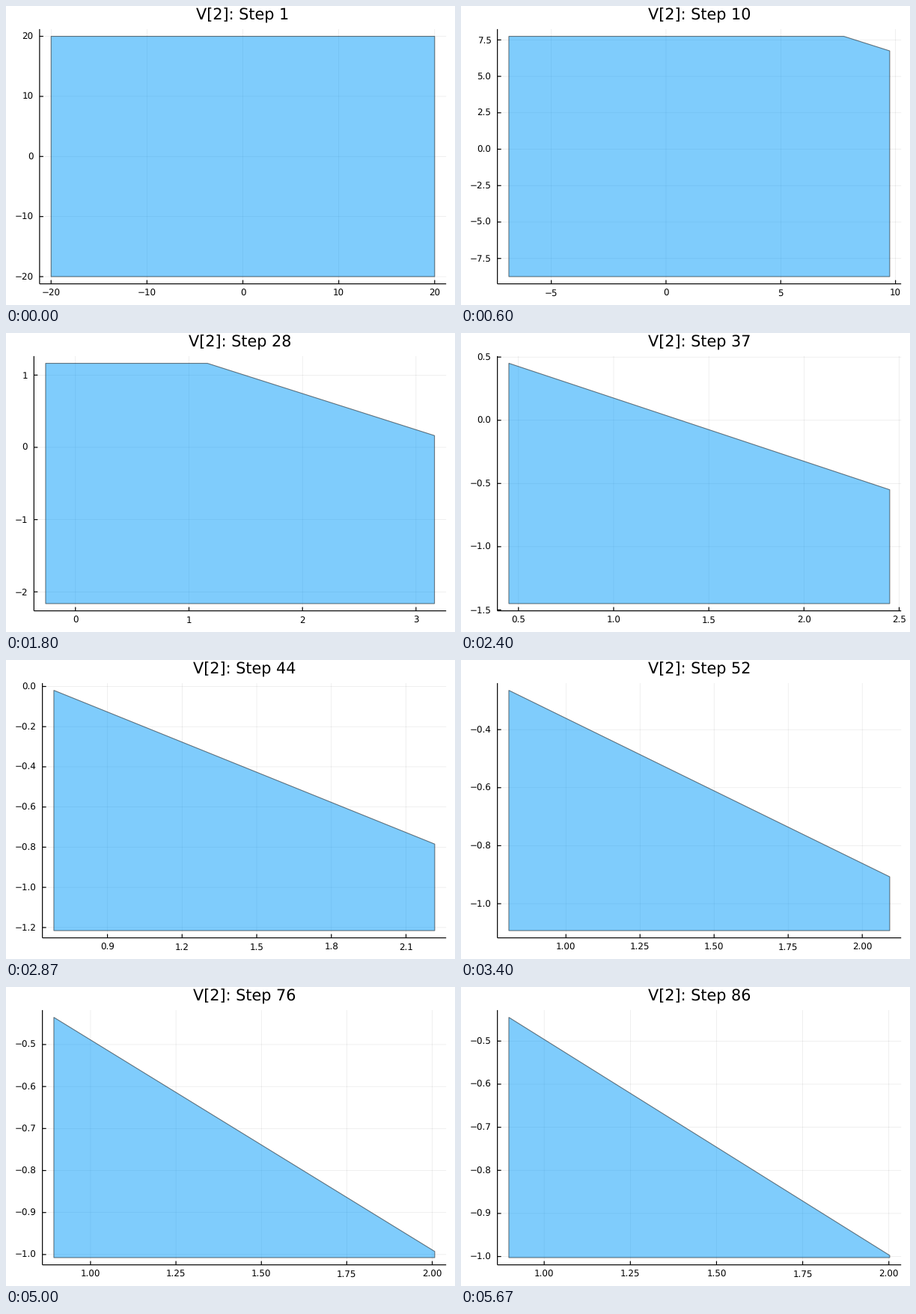
Recreate the animation shown at these times as a matplotlib script. Size 600 by 400 pixels, loop 5740 ms.

```python
import math

import matplotlib.pyplot as plt
from matplotlib.animation import FuncAnimation
from matplotlib.collections import LineCollection
from matplotlib.patches import Polygon

W, H, DPI = 600, 400, 100
STEPS, FPS = 86, 15
LOOP_MS, TICK_MS = 5740, 20
TOP, BOTTOM, RIGHT = 30.9, 371.7, 588.2
PT = 72 / DPI
TICK_SIZE, TITLE_SIZE = 11.86, 20.75
TICK_LEN = 5
DISCOUNT, BOUND = 0.9, 20
NICE = [(1, 1.0), (5, 0.9), (2, 0.7), (2.5, 0.5), (3, 0.2)]
EM = {"−": 0.838, ".": 0.318}

plt.rcParams.update({"font.family": "DejaVu Sans", "text.hinting": "none"})


def value_set(step):
    """Corners of the set, which shrinks geometrically to a triangle."""
    if step == 1:
        b = BOUND
        return [(-b, -b), (b, -b), (b, b), (-b, b)]
    e = BOUND * DISCOUNT ** (step - 1)
    left, right, low = 0.9 - e, 2 + e, -1 - e
    pts = [(left, low), (right, low), (right, e - 1)]
    if e > left:
        pts += [(e, e), (left, e)]
    else:
        pts.append((left, 2 * e - 0.45))
    return pts


def padded(vals):
    lo, hi = min(vals), max(vals)
    pad = 0.03 * (hi - lo)
    return lo - pad, hi + pad


def nice_ticks(lo, hi):
    """Best scoring set of 4 to 8 round ticks, with their labels."""
    span = hi - lo
    top = math.ceil(math.log10(span))
    best, choice = (-math.inf,), None
    for z in range(top, top - 3, -1):
        for q, niceness in NICE:
            gap = q * 10.0 ** z
            first, last = math.ceil(lo / gap), math.floor(hi / gap)
            n = last - first + 1
            if not 4 <= n <= 8:
                continue
            # a grid reaching zero scores higher if it is not too wide
            reach = (max(math.ceil(hi / gap), 0)
                     - min(math.floor(lo / gap), 0))
            zero = reach * gap < 2 * span and reach < 16
            score = ((1 - abs(n - 5) / 5) / 4 + zero / 6
                     + 0.75 * span / ((n - 1) * gap) + niceness / 4)
            # equal scores: coarser grid first
            rank = (round(score, 9), z, -reach)
            if rank > best:
                best, choice = rank, (gap, first, last)
    gap, first, last = choice
    places = next(d for d in range(8) if abs(round(gap, d) - gap) < 1e-9)
    ticks = [i * gap for i in range(first, last + 1)]
    return ticks, [f"{t:.{places}f}".replace("-", "−") for t in ticks]


def text_width(s):
    return TICK_SIZE * sum(EM.get(c, 0.636) for c in s)


fig = plt.figure(figsize=(W / DPI, H / DPI), dpi=DPI, facecolor="white")
ax = fig.add_axes([0, 0, 1, 1])


def segments(segs, width, alpha, z):
    ax.add_collection(LineCollection(
        segs, colors=[(0, 0, 0, alpha)], linewidths=width * PT, zorder=z,
        capstyle="butt", snap=False), autolim=False)


def label(x, y, s, size, ha):
    ax.text(x, y, s, fontsize=size * PT, ha=ha, va="baseline", color="black")


def plot_step(step):
    ax.cla()
    ax.set(xlim=(0, W), ylim=(H, 0))
    ax.axis("off")

    pts = value_set(step)
    xs, ys = zip(*pts)
    (x0, x1), (y0, y1) = padded(xs), padded(ys)
    xticks, xlabels = nice_ticks(x0, x1)
    yticks, ylabels = nice_ticks(y0, y1)
    left = 19.85 + max(map(text_width, ylabels))

    def px(x):
        return left + (x - x0) / (x1 - x0) * (RIGHT - left)

    def py(y):
        return BOTTOM - (y - y0) / (y1 - y0) * (BOTTOM - TOP)

    gx, gy = [px(t) for t in xticks], [py(t) for t in yticks]
    segments([[(x, TOP), (x, BOTTOM)] for x in gx]
             + [[(left, y), (RIGHT, y)] for y in gy], 0.6, 0.1, 1)

    corners = [(px(x), py(y)) for x, y in pts]
    ax.add_patch(Polygon(corners, fc=(0, 0.604, 0.98, 0.5),
                         ec=(0, 0, 0, 0.5), lw=1.1 * PT,
                         joinstyle="miter", snap=False, zorder=2))

    segments([[(left, TOP), (left, BOTTOM)], [(left, BOTTOM), (RIGHT, BOTTOM)]]
             + [[(x, BOTTOM), (x, BOTTOM - TICK_LEN)] for x in gx]
             + [[(left, y), (left + TICK_LEN, y)] for y in gy], 1.2, 1, 3)

    for x, s in zip(gx, xlabels):
        label(x, 387.5, s, TICK_SIZE, "center")
    for y, s in zip(gy, ylabels):
        label(left - 8.2, y + 4.3, s, TICK_SIZE, "right")
    label((left + RIGHT) / 2, 18.4, f"V[2]: Step {step}", TITLE_SIZE, "center")


shown = None


def draw(i):
    """Redraw only when the step changes; 15 ms rounds to the clock tick."""
    global shown
    step = min(int((i * TICK_MS + 15) * FPS / 1000) + 1, STEPS)
    if step != shown:
        plot_step(step)
        shown = step
    return []


anim = FuncAnimation(fig, draw, frames=LOOP_MS // TICK_MS,
                     init_func=lambda: [], interval=TICK_MS,
                     repeat=True, repeat_delay=0)
plt.show()
```
